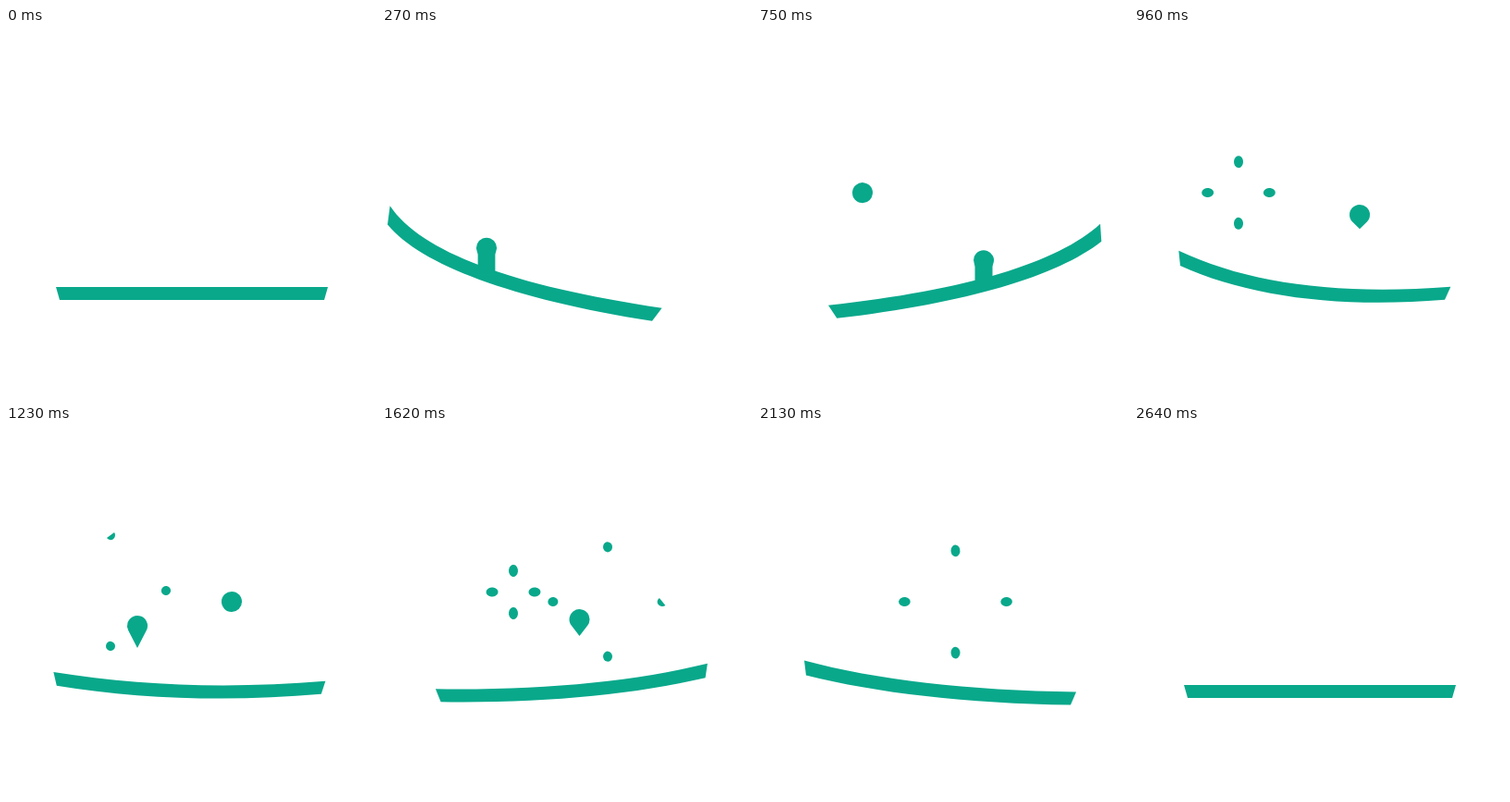
Recreate the animation shown at these times as an HTML page with a canvas. Size 400x400 px, loop 4.7 s.

```html
<!DOCTYPE html>
<html lang="en">
<head>
<meta charset="utf-8">
<title>Sloshing liquid</title>
<style>
html, body { margin: 0; width: 100%; height: 100%; overflow: hidden; background: #fff; }
canvas { display: block; width: 100vw; height: 100vh; }
</style>
</head>
<body>
<canvas width="400" height="400"></canvas>
<script>
const ctx = document.querySelector('canvas').getContext('2d');
const LOOP = 4700, STEP = 30;
const LEFT = 54, WIDTH = 294, LEVEL = 280, THICK = 14;
const R = 11, REACH = 60, SPREAD = 420, LIFE = 340;
const { PI, min, max, abs, sin, cos, acos } = Math;
const clamp = v => max(0, min(1, v));

// Turning points of the decaying swing; positive tilt lifts the right end
const swings = [
  { at: 0, tilt: 0, shift: 0 },
  { at: 290, tilt: -56, shift: -46 },
  { at: 750, tilt: 44, shift: 22 },
  { at: 1040, tilt: -34, shift: -12 },
  { at: 1410, tilt: 22, shift: 6 },
  { at: 2120, tilt: -17, shift: -4 },
  { at: 2640, tilt: 0, shift: 0 }
];

const drops = [
  { x: 113, y: 178, rise: 670, burst: 820 },
  { x: 244, y: 190, rise: 581, burst: 1250 },
  { x: 142, y: 179.5, rise: 429, burst: 1530 },
  { x: 213.5, y: 190, rise: 360, burst: 1830 }
];

function bandAt(t) {
  const k = max(1, swings.findIndex(s => t < s.at));
  const done = t >= swings.at(-1).at;
  const a = swings[done ? 0 : k - 1], b = swings[done ? 0 : k];
  const span = b.at - a.at || 1, u = done ? 0 : (t - a.at) / span, ease = u * u * (3 - 2 * u);
  const tilt = a.tilt + (b.tilt - a.tilt) * ease;
  const x = LEFT + a.shift + (b.shift - a.shift) * ease;
  const speed = abs(b.tilt - a.tilt) / span * 6 * u * (1 - u);
  // Both ends lift with tilt and speed, while the middle stays near its level
  const bend = -.55 * abs(tilt) - 28 * speed;
  const mid = LEVEL - bend / 3 - tilt * tilt / 100, skew = .004 * tilt;
  return {
    tilt,
    xs: [0, 1 / 3 + skew, 2 / 3 + skew, 1].map(f => x + f * WIDTH),
    ys: [LEVEL + bend + tilt, mid + tilt / 3, mid - tilt / 3, LEVEL + bend - tilt]
  };
}

function drawBand({ xs, ys, tilt }) {
  const lean = .12 * tilt;
  const low = ys.map(y => y + THICK);
  ctx.beginPath();
  ctx.moveTo(xs[0], ys[0]);
  ctx.bezierCurveTo(xs[1], ys[1], xs[2], ys[2], xs[3], ys[3]);
  ctx.lineTo(xs[3] - 4 + lean, low[3] + max(0, tilt) / 9);
  ctx.bezierCurveTo(xs[2], low[2], xs[1], low[1], xs[0] + 4 + lean, low[0] + max(0, -tilt) / 9);
  ctx.fill();
}

function cubic([a, b, c, d], u) {
  const v = 1 - u;
  return v * v * v * a + 3 * v * v * u * b + 3 * v * u * u * c + u * u * u * d;
}

// Height of the band's centre line at x
function bandY({ xs, ys }, x) {
  let u = .5;
  for (let h = .25; h > .001; h /= 2) u += cubic(xs, u) < x ? h : -h;
  return cubic(ys, u) + THICK / 2;
}

function drawDrop(d, t, band) {
  const age = t - d.burst + d.rise;
  if (age <= 0) return;
  const left = (LEVEL + 6 - d.y) * (1 - age / d.rise) ** 3;
  const root = bandY(band, d.x), y = min(d.y + left, root);
  const r = R * clamp(age / 80);
  const tail = max(r, min(R + .36 * left, root - y));
  const a = acos(r / tail);
  ctx.beginPath();
  ctx.arc(d.x, y, r, PI / 2 + a, PI * 2.5 - a);
  ctx.lineTo(d.x, y + tail);
  ctx.fill();
  const neck = min(r, 9.5) * clamp((left - 40) / 20);
  ctx.fillRect(d.x - neck, y, 2 * neck, root - y);
}

// Four dots fly apart, then are wiped away one after another
function drawBurst(d, t, first) {
  const v = 1 - clamp((t - d.burst) / SPREAD);
  const dist = REACH * (1 - v * v), stretch = 5 + 1.5 * min(1, 3 * v);
  for (let k = 0; k < 4; k++) {
    const dir = (first + k) * PI / 2;
    const keep = PI * (1 - clamp((t - d.burst - LIFE - 40 * k) / 60));
    if (!keep) continue;
    ctx.beginPath();
    ctx.ellipse(d.x + dist * cos(dir), d.y + dist * sin(dir),
      stretch, 5, dir, .8 * PI - keep, .8 * PI + keep);
    ctx.fill();
  }
}

function draw(now) {
  const t = Math.floor(now % LOOP / STEP) * STEP;
  const band = bandAt(t);
  ctx.fillStyle = '#fff';
  ctx.fillRect(0, 0, 400, 400);
  ctx.fillStyle = '#09a88b';
  drawBand(band);
  drops.forEach((d, i) => {
    if (t < d.burst) drawDrop(d, t, band);
    else drawBurst(d, t, 2 * i + 2);
  });
}

const begin = performance.now();
function tick() {
  draw(performance.now() - begin);
  requestAnimationFrame(tick);
}
tick();
</script>
</body>
</html>
```
